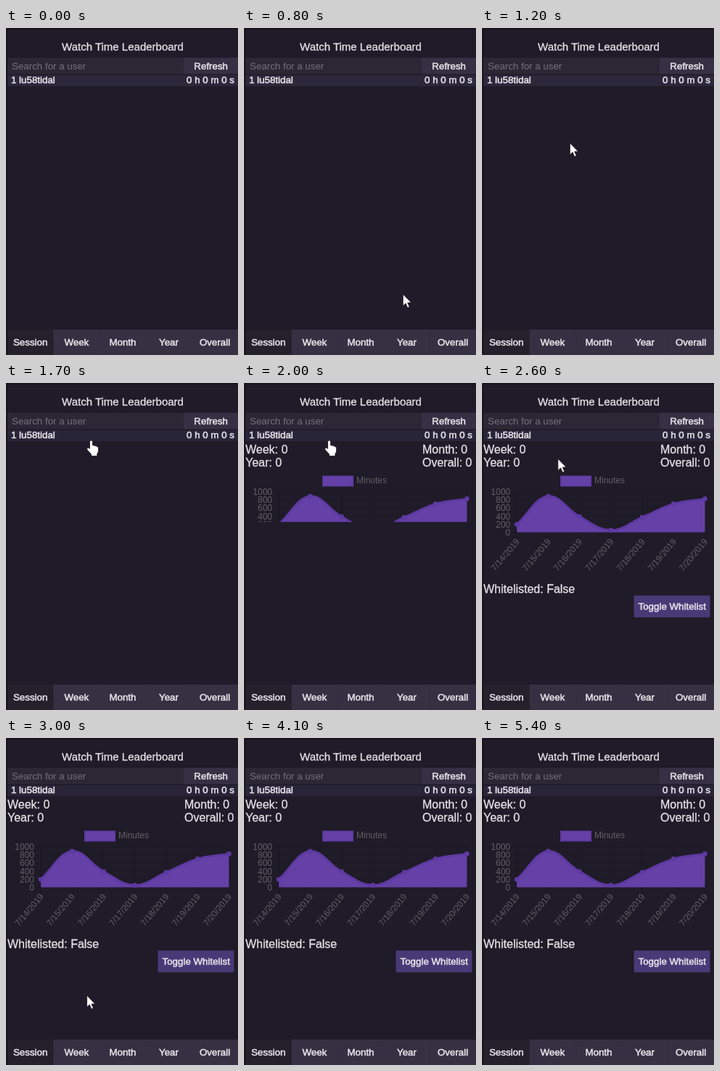
These frames come from a looping animation (320 by 450 pixels, 5.7 s). An HTML page:

```html
<!DOCTYPE html>
<html lang="en">
<head>
<meta charset="utf-8">
<title>Watch Time Leaderboard</title>
<style>
  html, body { margin: 0; width: 100%; height: 100%; overflow: hidden; background: #1f1b28; }
  svg { display: block; width: 320px; height: 450px; }
  text {
    font-family: "Liberation Sans", Arial, sans-serif; white-space: pre;
    fill: #e4e2e8; stroke: #e4e2e8; stroke-width: .3px;
  }
  .title { font-size: 15px; }
  .ui { font-size: 13.333px; }
  .strong { stroke-width: .55px; }
  .hint { fill: #74707d; stroke: none; }
  .body { font-size: 16px; }
  .tick { font-size: 12px; fill: #625f67; stroke: none; }
  .cursor { fill: #fff; stroke: #16131c; stroke-width: .8; stroke-linejoin: round; }
</style>
</head>
<body>
<svg id="stage" viewBox="0 0 320 450">
  <defs><clipPath id="slide"><rect id="window" y="80" width="320" height="0"/></clipPath></defs>
</svg>
<script>
const LOOP = 5700, STEP = 100;
const SLIDE = { start: 1813, length: 400, top: 80, height: 248 };
const PURPLE = '#6440a7', LINE = '#5d39a0';
const stage = document.getElementById('stage');
const slideWindow = document.getElementById('window');

function add(parent, tag, attrs, content) {
  const node = document.createElementNS('http://www.w3.org/2000/svg', tag);
  for (const key in attrs) node.setAttribute(key, attrs[key]);
  if (content) node.textContent = content;
  parent.append(node);
  return node;
}
const box = (parent, x, y, width, height, fill) =>
  add(parent, 'rect', { x, y, width, height, fill });
const label = (parent, x, y, content, kind, anchor = 'start', extra = {}) =>
  add(parent, 'text', { x, y, class: kind, 'text-anchor': anchor, ...extra }, content);

// Page frame
box(stage, 0, 0, 320, 450, '#1f1b28');
box(stage, 0, 0, 320, 2, '#16131c');
box(stage, 0, 0, 2, 450, '#16131c');
label(stage, 161, 31, 'Watch Time Leaderboard', 'title', 'middle');
box(stage, 2, 41, 243, 22.5, '#2b2734');
label(stage, 8, 57, 'Search for a user', 'ui hint');
box(stage, 245, 41, 75, 22.5, '#353043');
label(stage, 282.7, 57, 'Refresh', 'ui strong', 'middle');
const row = box(stage, 2, 65, 318, 15, '#2c283b');
label(stage, 7, 76, '1 lu58tidal', 'ui strong');
label(stage, 315, 76, '0 h 0 m 0 s', 'ui strong', 'end');

// Details panel
const panel = add(stage, 'g', { 'clip-path': 'url(#slide)' });
[['Week: 0', 2, 97], ['Year: 0', 2, 115], ['Month: 0', 246, 97],
 ['Overall: 0', 246, 115], ['Whitelisted: False', 2, 289]]
  .forEach(([content, x, y]) => label(panel, x, y, content, 'body'));
box(panel, 209.5, 292.5, 105, 30, '#493a77');
label(panel, 262.2, 312, 'Toggle Whitelist', 'ui strong', 'middle');
drawChart(panel);

// Tabs
['Session', 'Week', 'Month', 'Year', 'Overall'].forEach((name, i) => {
  box(stage, 2 + 63.6 * i, 415, 64, 35, i ? '#353042' : '#24202c');
  label(stage, 33.7 + 63.6 * i, 437, name, 'ui strong', 'middle');
});

const arrow = add(stage, 'path', {
  class: 'cursor', d: 'M.3 .3V16.4L4 12.9L6.6 19L9.2 17.9L6.7 12H11.7Z' });
const hand = add(stage, 'path', {
  class: 'cursor', transform: 'translate(111 78.5)',
  d: 'M4.5 2.5Q4.5 .5 6.5 .5T8.5 2.5V7.5Q10 6.5 11.5 8Q13.5 7.2 14 9Q16.5 8.5 16.5 11V14.5' +
     'Q16.5 17 14.8 19V22H6.5V19.5L1 13.5Q0 11 2 10.5Q3.5 10.5 4.5 12Z' });

function drawChart(parent) {
  const left = 48, gap = 43.25, zero = 205.4, top = 150;
  const py = value => zero - value * (zero - top) / 1000;
  const points = [195, 895, 390, 50, 370, 705, 830].map((v, i) => [left + gap * i, py(v)]);

  box(parent, 108, 127.5, 43, 15, LINE);
  box(parent, 109.5, 129, 40, 12, PURPLE);
  label(parent, 155, 138, 'Minutes', 'tick');

  for (let v = 0; v <= 1000; v += 200) {
    label(parent, 39, py(v) + 4.3, String(v), 'tick', 'end');
    add(parent, 'path', { d: `M38 ${py(v)}H307.5`, stroke: '#000', 'stroke-opacity': v ? .1 : .25 });
  }
  points.forEach(([x], i) => {
    add(parent, 'path', { d: `M${x} ${top}V215`, stroke: '#000', 'stroke-opacity': i ? .1 : .25 });
    label(parent, 0, 4, `7/${14 + i}/2019`, 'tick', 'end',
      { transform: `translate(${x + 1.3} 216) rotate(-50)` });
  });

  const curve = smooth(points, .4, top, zero);
  add(parent, 'path', { d: `${curve}V${zero}H${left}Z`, fill: PURPLE });
  add(parent, 'path', { d: curve, fill: 'none', stroke: LINE, 'stroke-width': 3 });
  points.forEach(([cx, cy]) => add(parent, 'circle', { cx, cy, r: 3.3, fill: LINE }));
}

// Cubic spline whose handles follow the chord between neighbours
function smooth(points, tension, minY, maxY) {
  const clampY = y => Math.min(maxY, Math.max(minY, y));
  const handles = points.map((p, i) => {
    const a = points[i - 1] || p, b = points[i + 1] || p;
    const da = Math.hypot(p[0] - a[0], p[1] - a[1]);
    const db = Math.hypot(b[0] - p[0], b[1] - p[1]);
    const at = k => [p[0] + k * (b[0] - a[0]), clampY(p[1] + k * (b[1] - a[1]))];
    return { before: at(-tension * da / (da + db)), after: at(tension * db / (da + db)) };
  });
  return points.slice(1).reduce(
    (d, p, i) => `${d}C${handles[i].after} ${handles[i + 1].before} ${p}`, `M${points[0]}`);
}

// Pointer: [time, x, y]
const PATH = [
  [200, 300, 441], [300, 281, 425], [500, 246, 394], [700, 225, 371], [800, 219, 366],
  [900, 204, 343], [1000, 176, 290], [1100, 144, 215], [1200, 121, 158], [1300, 111, 112],
  [1400, 112, 89], [2500, 108, 89], [2600, 104.5, 104], [2700, 107, 160], [2800, 110, 236],
  [2900, 111, 312], [3000, 111.3, 354], [3100, 111, 386], [3200, 108, 420]
];
const HAND_FROM = 1500, HAND_TO = 2500, LEAVES = 3300;

function pointerAt(t) {
  const i = Math.max(1, PATH.findIndex(p => p[0] >= t));
  const [t0, x0, y0] = PATH[i - 1], [t1, x1, y1] = PATH[i];
  const k = (t - t0) / (t1 - t0);
  return [x0 + (x1 - x0) * k, y0 + (y1 - y0) * k];
}
const show = (node, on) => node.setAttribute('visibility', on ? 'visible' : 'hidden');

function render(t) {
  const k = Math.min(1, Math.max(0, (t - SLIDE.start) / SLIDE.length));
  slideWindow.setAttribute('height', SLIDE.height * (.5 - Math.cos(Math.PI * k) / 2));
  row.setAttribute('fill', t >= 1700 ? '#292539' : '#2c283b');

  const onRow = t >= HAND_FROM && t < HAND_TO;
  const moving = t >= PATH[0][0] && t < LEAVES && !onRow;
  show(hand, onRow);
  show(arrow, moving);
  if (moving) arrow.setAttribute('transform', `translate(${pointerAt(t)})`);
}

const begin = performance.now();
function frame() {
  const t = (performance.now() - begin) % LOOP;
  render(Math.floor(t / STEP) * STEP);
  requestAnimationFrame(frame);
}
frame();
</script>
</body>
</html>
```
